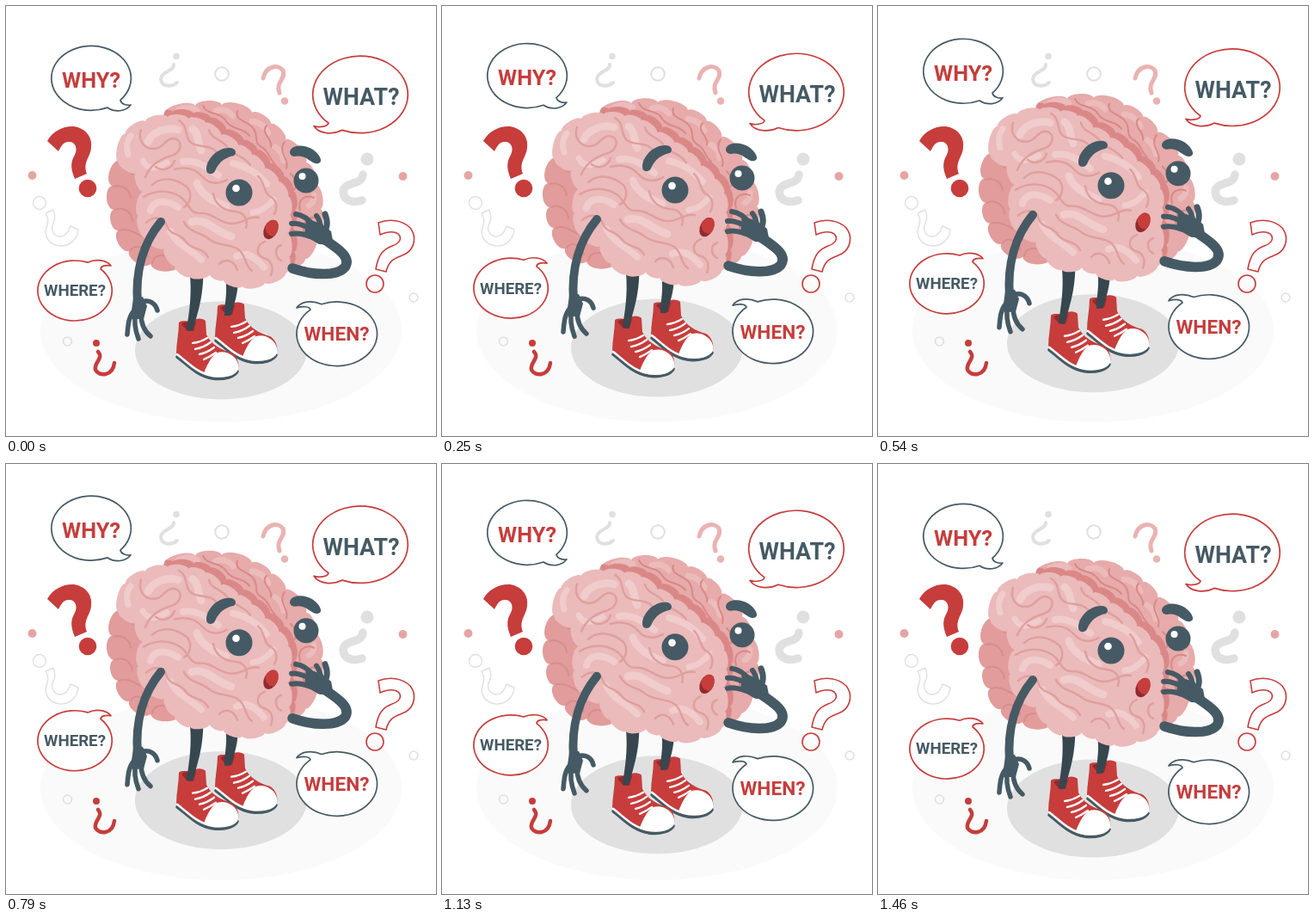
An HTML page with a canvas for the animation above (1.5 s loop, 500x500 px).

```html
<!DOCTYPE html>
<html lang="en">
<head>
<meta charset="utf-8">
<style>
html, body { margin: 0; width: 100%; height: 100%; overflow: hidden; background: #fff; }
canvas { display: block; width: 500px; height: 500px; }
</style>
</head>
<body>
<canvas id="stage" width="500" height="500"></canvas>
<script>
const ctx = document.getElementById('stage').getContext('2d');
const LOOP = 1500, STEPS = 36, BOB = 9.5;
const RED = '#c63d3c', DARK_RED = '#8f2b2f', DARK = '#455a64', LEG = '#37474f';
const GRAY = '#e0e0e0', ROSE = '#e5a5a4';
const LIGHT = '#ebbaba', MID = '#e6abaa', DEEP = '#e19c9b', FOLD = '#da8887', GROOVE = '#df9f9e';

ctx.lineCap = ctx.lineJoin = 'round';

function fill(d, color) {
  ctx.fillStyle = color;
  ctx.fill(d instanceof Path2D ? d : new Path2D(d));
}

function stroke(d, color, width) {
  ctx.strokeStyle = color;
  ctx.lineWidth = width;
  ctx.stroke(d instanceof Path2D ? d : new Path2D(d));
}

function oval(x, y, rx, ry = rx, turn = 0) {
  const path = new Path2D();
  path.ellipse(x, y, rx, ry, turn, 0, Math.PI * 2);
  return path;
}

const dot = (x, y, r, color) => fill(oval(x, y, r), color);
const ring = (x, y, r, color, width) => stroke(oval(x, y, r), color, width);

// Closed clockwise outline whose edges bulge outwards between the given valleys.
function scallop(points, bulge) {
  const path = new Path2D();
  path.moveTo(...points[0]);
  points.forEach(([x, y], i) => {
    const [nx, ny] = points[(i + 1) % points.length];
    const dx = nx - x, dy = ny - y;
    const ox = dy * bulge, oy = -dx * bulge;
    path.bezierCurveTo(x + dx * 0.08 + ox, y + dy * 0.08 + oy,
      x + dx * 0.92 + ox, y + dy * 0.92 + oy, nx, ny);
  });
  path.closePath();
  return path;
}

const farLobe = scallop([[184, 125], [220, 116], [251, 115], [286, 124], [308, 137], [325, 155],
  [349, 182], [360, 207], [366, 236], [361, 264], [348, 294], [322, 306], [290, 260], [230, 180]], 0.23);
const sideLobe = scallop([[210, 180], [240, 296], [203, 300], [168, 300], [143, 285], [130, 261],
  [125, 237], [123, 209], [133, 179]], 0.33);
const nearLobe = scallop([[131, 182], [139, 148], [162, 134], [188, 129], [212, 131], [232, 136],
  [250, 150], [270, 162], [286, 173], [301, 189], [317, 204], [328, 221], [330, 243], [327, 264],
  [329, 292], [325, 311], [301, 322], [275, 326], [253, 319], [237, 312], [214, 315], [196, 302],
  [184, 282], [162, 270], [154, 244], [159, 216], [151, 194]], 0.22);

const nearShine = [
  ['M145 151Q138 160 142 173', 7],
  ['M165 158C170 146 188 140 200 144', 9],
  ['M159 180C164 190 174 190 187 182', 7],
  ['M217 143C225 149 222 158 227 168', 9],
  ['M206 181C224 178 236 190 247 197', 8],
  ['M222 206C226 218 240 227 256 233', 9],
  ['M168 238C172 224 188 226 200 234', 8],
  ['M216 251C232 246 242 262 262 268', 9],
  ['M191 262C200 279 214 282 227 295', 8],
  ['M264 183C277 186 291 192 303 207', 8],
  ['M268 291C280 285 291 293 300 304', 8],
  ['M287 240C297 239 303 234 311 225', 7]
];
const nearGrooves = [
  'M157 144C153 155 160 166 171 166C184 166 184 154 195 154C207 156 204 170 193 174C180 178 168 184 162 199',
  'M201 133C212 139 207 150 214 158C222 166 236 160 244 169C251 178 242 186 235 182',
  'M236 144C238 155 252 155 258 165C264 174 277 174 284 185',
  'M196 190C210 186 221 190 229 199C237 208 248 207 257 202M170 208C182 197 199 201 211 211C217 219 214 230 207 234',
  'M160 222C174 213 191 214 203 222C214 230 213 242 226 241C240 240 247 252 261 253C276 254 282 243 294 246',
  'M163 252C173 243 184 246 187 256C191 267 203 264 209 274C215 284 229 280 235 292',
  'M207 251C212 263 226 263 236 271C247 280 260 276 270 283C280 290 277 302 286 308',
  'M248 300C256 292 266 297 269 307M301 274C291 278 290 289 299 293C308 295 312 303 308 313',
  'M293 198C302 206 299 218 308 222C315 226 316 235 312 242M320 278C310 282 314 293 320 296',
  'M174 187C181 193 193 190 196 180M241 218C243 231 253 238 266 239C277 240 282 248 279 258'
];
const sideGrooves = [
  'M133 181C142 180 148 187 147 196M125 210C134 207 144 213 145 223M127 237C137 232 147 241 147 250',
  'M132 261C143 257 152 266 161 269M145 284C151 275 163 282 165 292M170 299C172 289 184 287 190 295'
];
const farShine = ['M200 121Q212 115 222 121', 'M244 122Q256 118 264 128',
  'M286 134Q300 136 305 148', 'M313 164Q322 170 323 180', 'M352 232Q359 228 358 220'];
const farGrooves = [
  'M229 116C234 128 249 122 256 134C263 145 277 141 283 151',
  'M269 122C265 134 282 133 288 143C294 151 287 158 297 164C306 168 306 179 313 184',
  'M303 139C295 148 311 155 308 164M324 158C315 171 330 177 326 189',
  'M331 195C340 204 338 213 332 216M358 223C348 219 338 225 342 238M362 246C350 244 343 254 347 264'
];

function drawBrain() {
  fill(farLobe, MID);
  farShine.forEach(d => stroke(d, '#ecbbbb', 7));
  farGrooves.forEach(d => stroke(d, FOLD, 2));
  ctx.save();
  ctx.clip(farLobe);
  ctx.translate(6, -6);
  fill(nearLobe, FOLD);
  ctx.restore();

  fill(sideLobe, DEEP);
  sideGrooves.forEach(d => stroke(d, '#d88d8c', 2));
  fill(nearLobe, LIGHT);
  nearShine.forEach(([d, width]) => stroke(d, '#f0cccc', width));
  nearGrooves.forEach(d => stroke(d, GROOVE, 2.4));
}

function drawFace() {
  dot(271, 217, 15.5, DARK);
  dot(267.5, 212, 4.3, '#fff');
  dot(349, 203, 14.5, DARK);
  dot(344.5, 198, 4, '#fff');
  fill('M233 190C233 178 246 164.5 260 165C267 165 269 171 265 174C256 176 248 180 243 192C240 197 233 196 233 190Z', DARK);
  fill('M331 167C335 161 348 161 357 167C365 173 368 180 365 182C361 185 357 182 352 179C346 174 340 174 335 175C330 174 329 170 331 167Z', DARK);
  const mouth = oval(308, 260, 7.8, 11.8, 0.45);
  fill(mouth, DARK_RED);
  ctx.save();
  ctx.clip(mouth);
  fill(oval(312, 256, 10, 12, 0.45), RED);
  ctx.restore();
}

function drawArms() {
  stroke('M180 251C160 275 150 308 153 346', DARK, 10);
  fill('M148 340L159 338L164 349L160 364L147 364L146 354Z', DARK);
  stroke('M158 344C167 341 174 346 176 354', DARK, 5.5);
  stroke('M149 354C142 362 142 372 141 382', DARK, 5.5);
  stroke('M151 358C148 369 151 379 154 387', DARK, 5.5);
  stroke('M157 358C157 371 162 379 168 384', DARK, 5.5);

  stroke('M333 305C356 313 384 315 394 304C402 292 386 282 368 270', DARK, 11.5);
  fill('M349 247L366 253L378 262L381 278L364 277L347 267Z', DARK);
  stroke('M337 242C346 243 352 248 358 256', DARK, 6);
  stroke('M332 253C341 252 349 256 357 261', DARK, 6);
  stroke('M332 265C342 263 350 267 360 270', DARK, 6);
  stroke('M371 242C375 252 373 258 370 265', DARK, 7);
  stroke('M361 244C365 249 366 255 367 260', DARK, 6);
}

function drawShoe(x, y) {
  ctx.save();
  ctx.translate(x, y);
  fill('M201 368C205 365 211 367 216 367C221 362 229 363 232 366L233 382C238 393 250 400 262 403C270 408 272 418 269 425C258 434 238 434 224 425C214 418 205 411 198 404C198 392 201 380 201 368Z', RED);
  fill('M204 370C208 366 216 367 221 367L218 378L211 378Z', DARK_RED);
  fill('M246 403C256 400 268 407 270 417C271 424 268 427 264 429C252 433 238 432 230 427C235 414 240 406 246 403Z', '#fff');
  stroke('M199 408C211 417 222 430 240 433C254 435 266 431 269 425', DARK, 3.6);
  stroke('M199 405C211 414 222 427 240 430C254 432 266 429 269 422', '#fff', 2.5);
  stroke('M217 392Q226 391 234 386M220 399Q230 397 238 391M225 405Q234 403 242 397M230 411Q237 408 244 403', '#fff', 2.3);
  ctx.restore();
}

function drawLegs() {
  drawShoe(45, -19);
  drawShoe(0, 0);
  fill('M255 314L270 314C270 335 266 345 261 360L254 360C254 345 258 335 255 314Z', LEG);
  fill('M213 304L229 304C231 335 222 360 217 378L210 377C213 355 217 335 213 304Z', LEG);
}

const bubbles = [
  { word: 'WHY?', x: 99, y: 96.5, size: 30, room: 68, line: DARK, ink: RED,
    d: 'M118 118.2A46.3 37.5 0 1 1 133 109.5C134 114 140 116 145 115C139 123 127 124 118 118.2Z' },
  { word: 'WHAT?', x: 413, y: 117.5, size: 33, room: 89, line: RED, ink: DARK,
    d: 'M370 132.1A55.3 44.8 0 1 1 391 144.4C380 150 364 149 358 139.5C365 142 374 140 375 136Z' },
  { word: 'WHERE?', x: 80, y: 339, size: 23, room: 72, line: RED, ink: DARK,
    d: 'M110 305.8A43.2 35 0 1 1 95 298.2C104 294 117 295 122 302C116 301 110 302 110 305.8Z' },
  { word: 'WHEN?', x: 384.5, y: 391, size: 27, room: 76, line: DARK, ink: RED,
    d: 'M367 346.8A46.8 37.3 0 1 1 354 353.2C353 349 345 349 338 351C343 343 356 342 367 346.8Z' }
];

function textWidth(word, size, face) {
  ctx.font = `bold condensed ${size}px "${face}", sans-serif`;
  return ctx.measureText(word).width;
}

// The lettering is condensed, so the narrowest installed humanist sans is used.
const face = ['Open Sans', 'Noto Sans', 'Roboto', 'Noto Sans CJK SC', 'Noto Sans CJK JP']
  .reduce((a, b) => textWidth('WHERE?', 30, b) < textWidth('WHERE?', 30, a) ? b : a);

function drawBubble({ word, x, y, size, room, line, ink, d }) {
  fill(d, '#fff');
  stroke(d, line, 1.7);
  const fitted = size * Math.min(1, room / textWidth(word, size, face));
  textWidth(word, fitted, face);
  ctx.textAlign = 'center';
  ctx.fillStyle = ink;
  ctx.fillText(word, x, y - (size - fitted) * 0.36);
}

function drawBackdrop() {
  fill(oval(250, 377, 210, 107), '#fafafa');

  fill('M48 157C54 145 68 139 79 140C92 142 101 152 99 165C98 176 89 182 94 195L80 201C74 187 76 180 80 173C84 165 80 158 74 158C67 157 64 163 61 169Z', RED);
  dot(95, 212, 10.3, RED);

  stroke('M46 241L55 237C58 245 57 249 54 255C52 262 57 268 63 268C70 268 73 262 75 256L84 260C83 272 73 280 62 279C50 277 44 268 47 258C49 252 50 248 46 241Z', GRAY, 1.4);
  ring(39, 229, 7.5, GRAY, 1.4);

  stroke('M195 68C196 76 180 76 180 85C181 94 192 95 199 89', GRAY, 4);
  dot(198, 58.5, 3.8, GRAY);

  stroke('M299 84C302 70 316 67 322 75C326 85 313 88 318 101', '#e9b3b2', 5);
  dot(324, 110.5, 4.3, '#e9b3b2');

  stroke('M415 196C414 209 394 203 392 216C393 228 405 229 414 226', GRAY, 9.5);
  dot(420, 178, 7.5, GRAY);

  stroke('M433 252C446 247 461 249 470 258C478 268 475 282 465 288C456 293 446 292 442 309L430 306C433 288 439 283 449 279C458 276 461 270 456 265C450 261 442 263 435 266Z', RED, 1.6);
  ring(429, 323, 10, RED, 1.6);

  stroke('M107 402C114 410 102 414 104 423C108 431 124 431 126 415', RED, 4.5);
  dot(105, 392, 4, RED);

  dot(30.5, 197, 5, ROSE);
  dot(461.5, 198, 5, ROSE);
  ring(251, 79, 7.8, GRAY, 2);
  ring(71.5, 390, 5, GRAY, 1.6);
  ring(474, 339, 5, GRAY, 1.6);
}

function draw(now) {
  const step = Math.floor((now % LOOP + 5) * STEPS / LOOP) % STEPS;
  const lift = BOB / 2 * (1 - Math.cos((step / STEPS + 0.02) * Math.PI * 2));
  ctx.fillStyle = '#fff';
  ctx.fillRect(0, 0, 500, 500);
  drawBackdrop();
  ctx.save();
  ctx.translate(0, -lift);
  fill(oval(250, 400.5, 100, 57), GRAY);
  drawLegs();
  drawBrain();
  drawFace();
  drawArms();
  bubbles.forEach(drawBubble);
  ctx.restore();
  requestAnimationFrame(draw);
}

requestAnimationFrame(draw);
</script>
</body>
</html>
```
